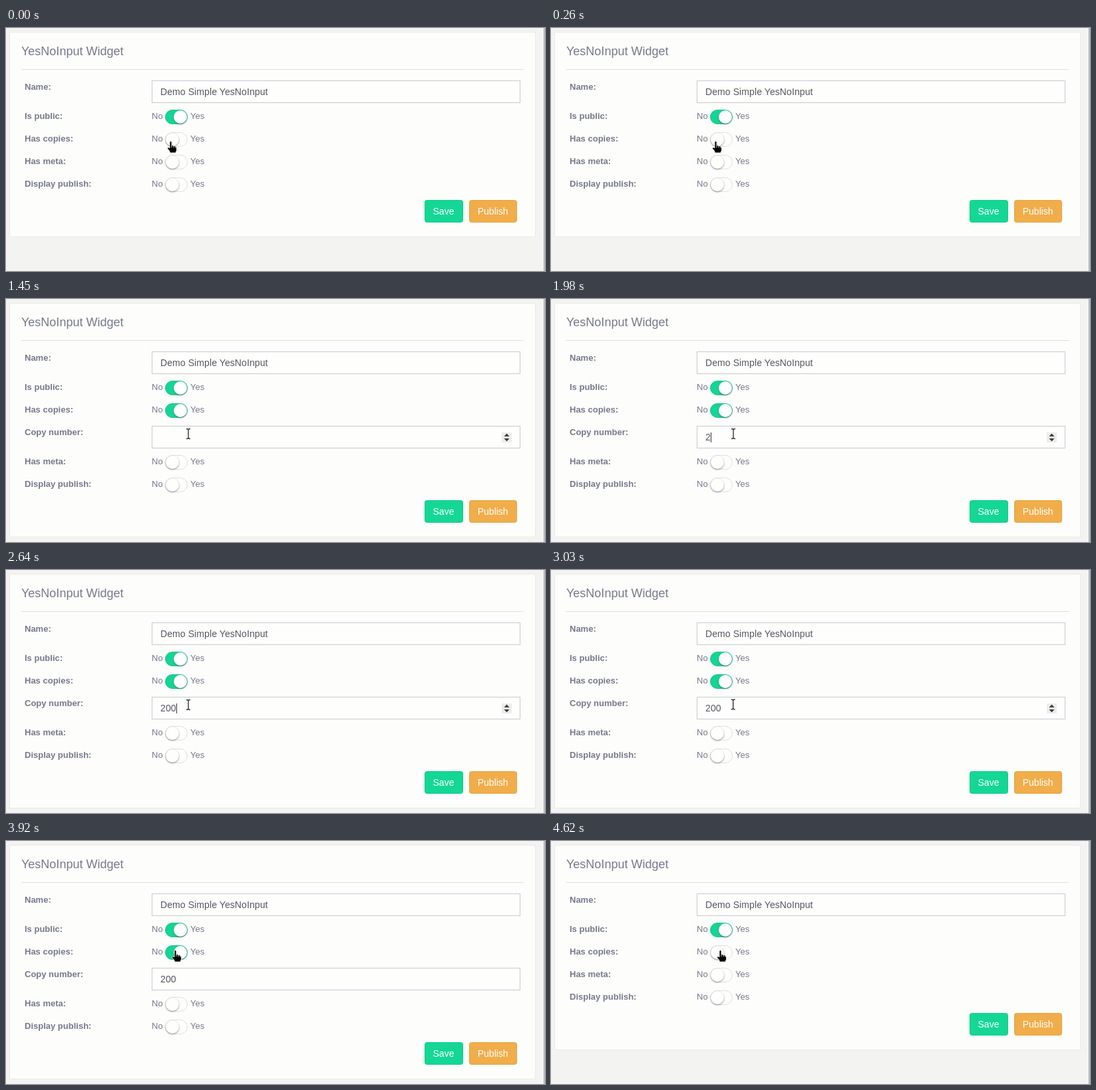
An HTML page for the animation above (4660 ms loop, 810 px wide and 366 px high).

```html
<!DOCTYPE html>
<html lang="en">
<head>
<meta charset="utf-8">
<title>YesNoInput Widget</title>
<style>
  html, body { margin: 0; width: 100%; height: 100%; overflow: hidden; background: #f3f3f1; }
  svg { display: block; width: 810px; height: 366px; font: 13px "Liberation Sans", Arial, sans-serif; }
  text { fill: #75798a; white-space: pre; }
  .label { font-weight: bold; }
  .title { font-size: 18px; }
  .value, .button { font-size: 14px; }
  .value { fill: #555560; letter-spacing: .09px; }
  .button { fill: #fff; text-anchor: middle; }
  .input { fill: #fefefd; stroke: #c9c9d4; }
  .knob { fill: #fefefd; filter: drop-shadow(0 1px 1.2px #44445599); }
</style>
</head>
<body>
<svg viewBox="0 0 810 366">
  <rect x="808" width="1.5" height="366" fill="#a2a2b2"/>
  <rect id="panel" x="5.5" y="6.5" width="790" fill="#fdfdfb" stroke="#ebebe6"/>
  <text class="title" x="23" y="41">YesNoInput Widget</text>
  <path d="M23 62.5H778" stroke="#dedfd3"/>
  <text class="label" x="28" y="93">Name:</text>
  <rect class="input" x="219.5" y="79.5" width="553" height="33"/>
  <text class="value" x="232" y="101">Demo Simple YesNoInput</text>
  <g id="switches"></g>
  <g id="copies">
    <text class="label" x="28" y="205">Copy number:</text>
    <rect class="input" x="219.5" y="191.5" width="553" height="33"/>
    <text id="count" class="value" x="232" y="213"></text>
    <path id="caret" d="M0 201V216" stroke="#333338"/>
    <g id="spinner">
      <rect x="745" y="201" width="15" height="15" fill="#ececea"/>
      <path d="M748.5 207L752.5 202.5L756.5 207ZM748.5 210L752.5 214.5L756.5 210Z" fill="#3d3d42"/>
    </g>
  </g>
  <g id="buttons">
    <rect x="629.5" y="259.5" width="57" height="33" rx="3" fill="#14d796" stroke="#12cc8d"/>
    <text class="button" x="657.5" y="281">Save</text>
    <rect x="696.5" y="259.5" width="71" height="33" rx="3" fill="#f0ad4a" stroke="#e6a444"/>
    <text class="button" x="731.7" y="281">Publish</text>
  </g>
  <g id="cursor">
    <g id="hand" stroke="#fefefd" stroke-width=".8" stroke-linejoin="round">
      <path fill="#000" d="M-2 1Q-2 -.5 -.5 -.5T1 1V6L3 5.5L4 7L6 6.5L7 8L8.5 8V13L7 17H-1.5L-2.5 14L-5.5 10.5Q-5 8 -3 9L-2 10Z"/>
      <path d="M1 6V9M4 7V9.5M7 8V10"/>
    </g>
    <path id="beam" fill="none" stroke="#333338" stroke-width="1.4"
      d="M-3 -7.5Q0 -7.5 0 -6Q0 -7.5 3 -7.5M0 -6V6M-3 7.5Q0 7.5 0 6Q0 7.5 3 7.5"/>
  </g>
</svg>
<script>
const LOOP = 4660, OPEN = 300, CLOSE = 4080, SLIDE = 300;
const FOCUS = 890, BLUR = 3880, BLINK = 500;
const edits = [[0, "0"], [930, ""], [1900, "2"], [2150, "20"], [2350, "200"]];
const cursorPath = [
  [0, 248, 171], [380, 248, 171], [700, 274, 203], [3000, 274, 203],
  [3400, 255, 173], [3560, 255, 173], [3750, 255, 165], [LOOP, 255, 165],
];

const $ = id => document.getElementById(id);
const clamp = v => Math.max(0, Math.min(1, v));
const ease = v => v * v * (3 - 2 * v);
const mix = (a, b, k) => a + (b - a) * k;
const show = (id, on) => $(id).setAttribute("visibility", on ? "visible" : "hidden");
const move = (node, x, y) => node.setAttribute("transform", `translate(${x} ${y})`);

const rows = ["Is public:", "Has copies:", "Has meta:", "Display publish:"].map((label, i) => {
  const row = document.createElementNS("http://www.w3.org/2000/svg", "g");
  const y = 134 + 34 * i;
  row.innerHTML = `<text class="label" x="28" y="${y + 3}">${label}</text>
    <text x="219" y="${y + 3}">No</text><text x="277" y="${y + 3}">Yes</text>
    <rect class="track" x="239.5" y="${y - 10.5}" width="33" height="21" rx="10.5"/>
    <circle class="knob" cy="${y}" r="10"/>`;
  $("switches").append(row);
  return row;
});

function setSwitch(row, on) {
  const color = (off, lit) => `rgb(${off.map((c, i) => mix(c, lit[i], on))})`;
  const track = row.querySelector(".track");
  track.setAttribute("fill", color([254, 254, 253], [20, 213, 148]));
  track.setAttribute("stroke", color([224, 224, 222], [30, 198, 142]));
  row.querySelector(".knob").setAttribute("cx", mix(250, 262, on));
}

function cursorAt(t) {
  const i = cursorPath.findIndex(p => p[0] > t);
  const [t0, x0, y0] = cursorPath[i - 1], [t1, x1, y1] = cursorPath[i];
  const k = ease((t - t0) / (t1 - t0));
  return [mix(x0, x1, k), mix(y0, y1, k)];
}

function draw(t) {
  const open = t >= OPEN && t < CLOSE;
  const drop = open ? 44 : 0;
  $("panel").setAttribute("height", 308 + drop);
  show("copies", open);
  [rows[2], rows[3], $("buttons")].forEach(node => move(node, 0, drop));
  setSwitch(rows[1], ease(clamp((t - OPEN) / SLIDE)) - ease(clamp((t - CLOSE) / SLIDE)));

  const [x, y] = cursorAt(t);
  const overInput = open && y > 191;
  move($("cursor"), x, y);
  show("hand", !overInput);
  show("beam", overInput);

  const [editTime, text] = edits.findLast(e => e[0] <= t);
  const focused = t >= FOCUS && t < BLUR;
  const lit = (t - Math.max(FOCUS, editTime)) % (2 * BLINK) < BLINK;
  $("count").textContent = text;
  move($("caret"), 232.5 + text.length * 8, 0);
  show("caret", focused && lit);
  show("spinner", open && (focused || overInput));
}

[1, 0, 0, 0].forEach((on, i) => setSwitch(rows[i], on));
const start = performance.now();
(function frame() {
  draw((performance.now() - start) % LOOP);
  requestAnimationFrame(frame);
})();
</script>
</body>
</html>
```
